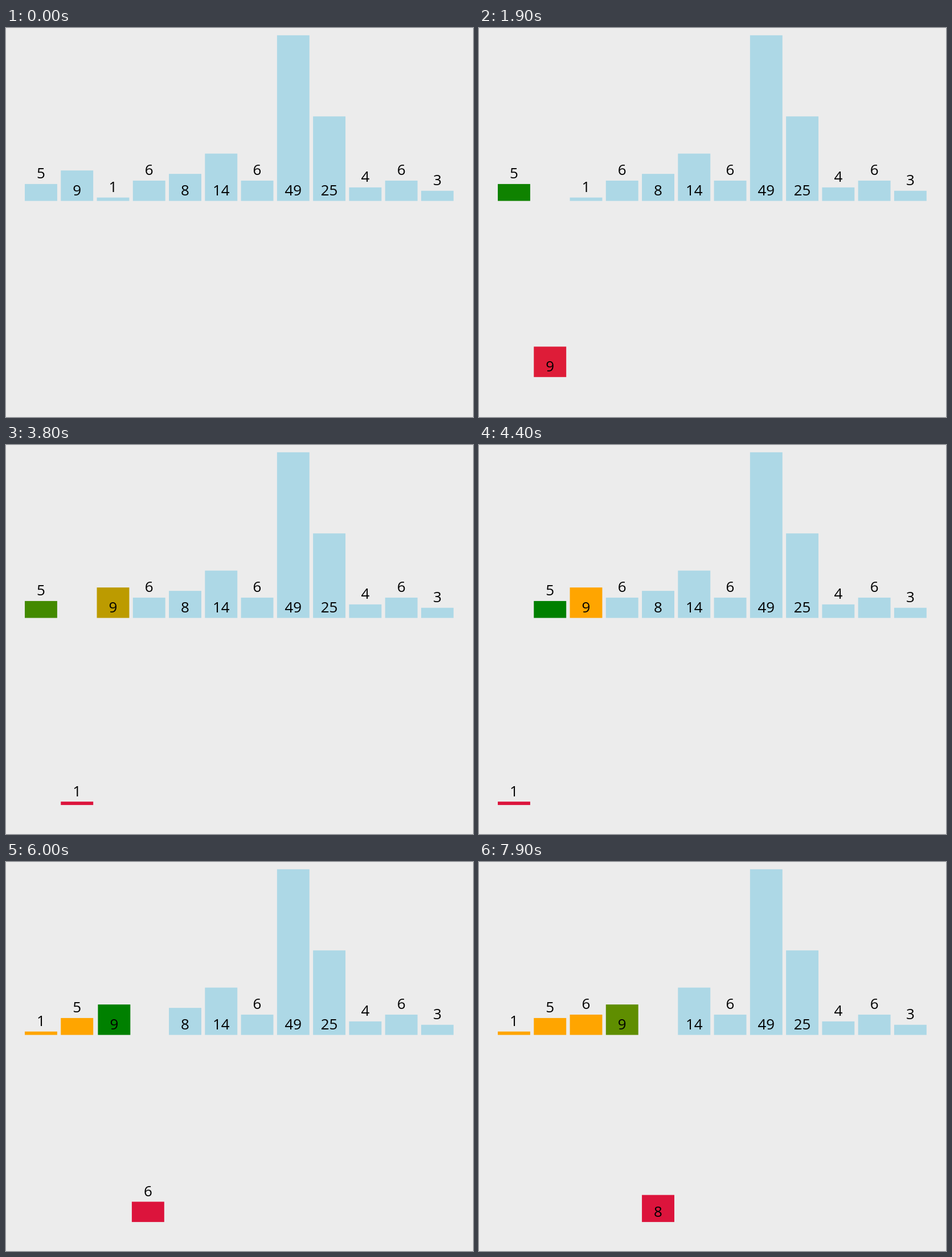
Animation, 820 px wide and 683 px high, one loop 8 s. Source, as an HTML page:

```html
<!DOCTYPE html>
<html lang="en">
<head>
<meta charset="utf-8">
<title>Insertion sort</title>
<style>
  html, body { margin: 0; width: 100%; height: 100%; overflow: hidden; background: #ececec; }
  svg { display: block; width: 100%; height: 100%; }
  text { font: 26px "Open Sans", "Noto Sans", sans-serif; text-anchor: middle; }
</style>
</head>
<body>
<svg id="stage" viewBox="0 0 820 683"></svg>
<script>
const LOOP = 8000, TICK = 100;
const START = 479, STEP = 456.7, TWEEN = 208;
const LEFT = 33, PITCH = 63.27, WIDTH = 56.9;
const BASE = 303.6, UNIT = 5.935, DROP = 328.5;

const IDLE = [173, 216, 230];
const SORTED = [255, 165, 0];
const PICKED = [220, 20, 60];
const COMPARED = [0, 128, 0];

const values = [5, 9, 1, 6, 8, 14, 6, 49, 25, 4, 6, 3];

// Runs the sort and records a snapshot of all bars after every step.
function sortStates() {
  const bars = values.map((value, slot) => ({ value, slot, down: 0, color: IDLE }));
  const order = [...bars];
  const states = [];
  const save = () => states.push(bars.map(b => ({ ...b })));
  const settle = () => bars.forEach(b => { if (b.color === COMPARED) b.color = SORTED; });

  save();
  bars[0].color = SORTED;
  save();
  for (let i = 1; i < order.length; i++) {
    const key = order[i];
    key.down = 1;
    key.color = PICKED;
    save();
    let j = i - 1;
    for (; j >= 0; j--) {
      const other = order[j];
      settle();
      other.color = COMPARED;
      save();
      if (other.value <= key.value) break;
      order[j + 1] = other;
      order[j] = key;
      other.slot = j + 1;
      key.slot = j;
      save();
    }
    settle();
    key.down = 0;
    key.color = SORTED;
    save();
  }
  return states;
}

const NS = "http://www.w3.org/2000/svg";
const stage = document.getElementById("stage");

function add(parent, tag, attrs = {}) {
  const el = document.createElementNS(NS, tag);
  for (const name in attrs) el.setAttribute(name, attrs[name]);
  return parent.appendChild(el);
}

const nodes = values.map(value => {
  const height = value * UNIT;
  const group = add(stage, "g");
  const rect = add(group, "rect", { y: BASE - height, width: WIDTH, height });
  const foot = value < 8 ? BASE - height : BASE;
  add(group, "text", { x: WIDTH / 2, y: foot - 9.6 }).textContent = value;
  return { group, rect };
});

const states = sortStates();
const mix = (a, b, p) => a + (b - a) * p;
const ease = t => t < 0.5 ? 4 * t ** 3 : 1 - 4 * (1 - t) ** 3;

function draw(time) {
  const since = Math.max(0, time - START);
  const step = Math.floor(since / STEP);
  const p = ease(Math.min(1, (since - step * STEP) / TWEEN));
  nodes.forEach(({ group, rect }, i) => {
    const a = states[step][i], b = states[step + 1][i];
    const x = LEFT + PITCH * mix(a.slot, b.slot, p);
    const y = DROP * mix(a.down, b.down, p);
    const rgb = a.color.map((c, n) => Math.round(mix(c, b.color[n], p)));
    group.setAttribute("transform", `translate(${x} ${y})`);
    rect.setAttribute("fill", `rgb(${rgb})`);
  });
}

const origin = performance.now();
function frame() {
  const time = (performance.now() - origin) % LOOP;
  draw(Math.floor(time / TICK) * TICK);
  requestAnimationFrame(frame);
}
frame();
</script>
</body>
</html>
```
